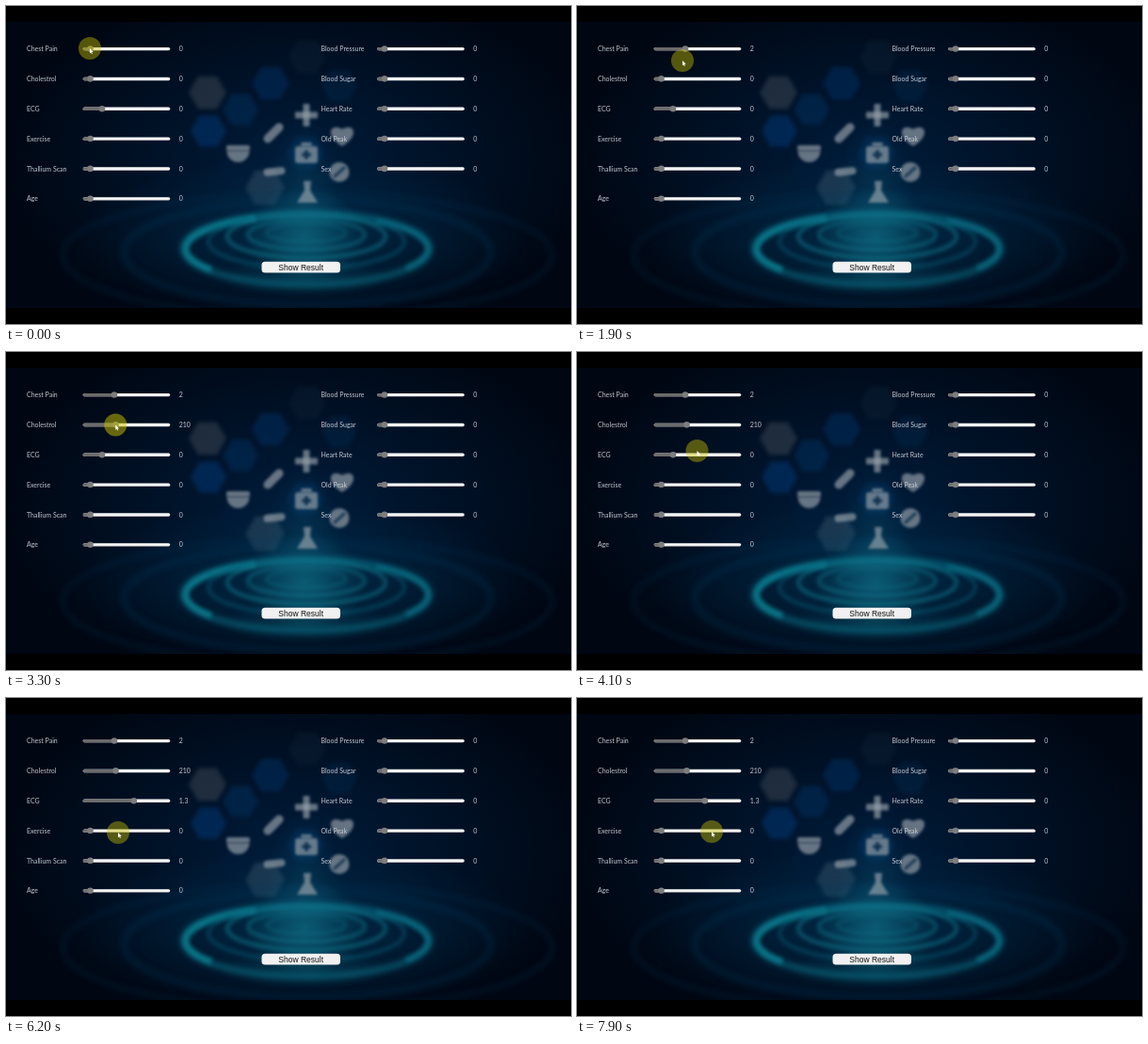
An HTML page with a canvas that plays this animation: 600 px wide and 338 px high, repeating every 8000 ms.

```html
<!DOCTYPE html>
<html>
<head>
<meta charset="utf-8">
<style>
  html, body { margin: 0; height: 100%; overflow: hidden; background: #000; }
  canvas { display: block; }
</style>
</head>
<body>
<canvas id="stage" width="600" height="338"></canvas>
<script>
const W = 600, H = 338, LOOP = 8000;
const ctx = document.getElementById('stage').getContext('2d');
const scenery = paintScenery();

const row = i => 45.5 + 31.85 * i;
const left = ['Chest Pain', 'Cholestrol', 'ECG', 'Exercise', 'Thallium Scan', 'Age'];
const right = ['Blood Pressure', 'Blood Sugar', 'Heart Rate', 'Old Peak', 'Sex'];

// Slider drags: time span, knob travel and the value shown
const drags = [
  { t0: 700, t1: 1500, x0: 89.5, x1: 115, show: u => Math.round(2 * u) },
  { t0: 2600, t1: 3200, x0: 89.5, x1: 116.5, show: u => Math.round(210 * u) },
  { t0: 4600, t1: 5100, x0: 102, x1: 135.8, show: u => +(1.3 * u).toFixed(1) }
];

// Pointer stops: time, x, y
const path = [
  [0, 89, 45], [700, 89, 45], [1500, 114.5, 45], [1800, 114.5, 45],
  [1900, 112, 58], [2500, 89, 77], [2600, 89, 77], [3200, 116.3, 77.5],
  [3700, 116.3, 77.5], [4100, 127.5, 105], [4500, 102, 109.5], [4600, 102, 109.5],
  [5100, 134.5, 110], [5500, 134.5, 110], [6200, 119, 143], [7900, 143, 142], [8000, 143, 142]
];

function ease(t, a, b) {
  const u = Math.min(1, Math.max(0, (t - a) / (b - a)));
  return u * u * (3 - 2 * u);
}
const mix = (a, b, u) => a + (b - a) * u;

function pointerAt(t) {
  const i = Math.max(1, path.findIndex(p => p[0] > t));
  const [a, b] = [path[i - 1], path[i]];
  const u = ease(t, a[0], b[0]);
  return [mix(a[1], b[1], u), mix(a[2], b[2], u)];
}

function shape(c, color, points) {
  c.fillStyle = color;
  c.beginPath();
  points.forEach(p => c.lineTo(p[0], p[1]));
  c.closePath();
  c.fill();
}
function disc(c, color, x, y, r, from = 0, to = 2 * Math.PI) {
  c.fillStyle = color;
  c.beginPath();
  c.arc(x, y, r, from, to);
  c.fill();
}
function bar(c, color, x, y, w, h, r) {
  c.fillStyle = color;
  c.beginPath();
  c.roundRect(x, y, w, h, r);
  c.fill();
}

function paintScenery() {
  const canvas = document.createElement('canvas');
  canvas.width = W;
  canvas.height = H;
  const c = canvas.getContext('2d');

  // Soft elliptical light
  const glow = (x, y, rx, ry, color) => {
    c.save();
    c.translate(x, y);
    c.scale(rx, ry);
    const g = c.createRadialGradient(0, 0, 0, 0, 0, 1);
    g.addColorStop(0, `rgba(${color})`);
    g.addColorStop(1, `rgba(${color.replace(/[\d.]+$/, '0')})`);
    c.fillStyle = g;
    c.fillRect(-1, -1, 2, 2);
    c.restore();
  };
  const hex = (x, y, r, color) => shape(c, color, [0, 1, 2, 3, 4, 5].map(k =>
    [x + r * Math.cos(k * Math.PI / 3), y + r * Math.sin(k * Math.PI / 3)]));
  const ring = (x, y, rx, ry, width, color, from = 0, to = 360) => {
    c.strokeStyle = color;
    c.lineWidth = width;
    c.beginPath();
    c.ellipse(x, y, rx, ry, 0, from * Math.PI / 180, to * Math.PI / 180);
    c.stroke();
  };
  const pill = (x, y, w, h, angle) => {
    c.save();
    c.translate(x, y);
    c.rotate(angle);
    bar(c, icon, -w / 2, -h / 2, w, h, h / 2);
    c.restore();
  };
  const plus = (x, y, r, w, color) => {
    bar(c, color, x - r, y - w / 2, 2 * r, w, 1);
    bar(c, color, x - w / 2, y - r, w, 2 * r, 1);
  };

  c.fillStyle = '#000713';
  c.fillRect(0, 0, W, H);
  glow(310, 165, 310, 190, '0,32,66,0.85');
  glow(315, 245, 240, 85, '0,55,88,0.6');

  c.filter = 'blur(2px)';
  hex(214, 92, 20, 'rgba(62,72,86,.5)');
  hex(215, 133, 19, 'rgba(0,58,120,.5)');
  hex(249, 110, 19, 'rgba(0,52,100,.45)');
  hex(281, 82, 20, 'rgba(0,56,112,.4)');
  hex(275, 193, 21, 'rgba(62,92,112,.42)');
  hex(318, 156, 20, 'rgba(0,50,95,.45)');
  hex(320, 54, 20, 'rgba(20,42,62,.3)');
  hex(354, 85, 19, 'rgba(0,50,90,.3)');
  hex(245, 175, 18, 'rgba(0,30,60,.35)');

  // Platform rings
  c.filter = 'blur(3px)';
  ring(320, 265, 260, 66, 5, 'rgba(0,60,95,.22)');
  ring(320, 262, 195, 56, 7, 'rgba(0,65,100,.25)');
  ring(319, 258, 131, 38, 6, 'rgba(12,125,148,.6)');
  c.filter = 'blur(2px)';
  ring(319, 258, 128, 36, 7, 'rgba(14,150,165,.6)', 142, 245);
  ring(319, 258, 129, 36, 6, 'rgba(14,140,160,.45)', -55, 35);
  ring(319, 250, 104, 29, 4, 'rgba(8,95,120,.5)');
  ring(319, 245, 84, 23, 4, 'rgba(14,120,140,.6)');
  ring(319, 243, 62, 16, 4, 'rgba(14,115,135,.55)');
  ring(319, 241, 42, 10, 3, 'rgba(14,115,135,.4)');
  c.filter = 'none';
  glow(317, 245, 65, 52, '20,135,155,0.5');
  glow(317, 205, 40, 85, '15,100,130,0.28');
  glow(318, 288, 90, 22, '10,110,135,0.35');

  // Medical icons
  c.filter = 'blur(1.6px)';
  const icon = 'rgba(150,160,170,.68)', gap = 'rgba(10,45,75,.9)';
  plus(319, 116, 12, 7, icon);
  pill(284, 135, 26, 9, -Math.PI / 4);
  pill(285, 176, 23, 8, -0.1);
  bar(c, icon, 234, 148, 25, 6, 2);
  disc(c, icon, 246.5, 154, 12, 0, Math.PI);
  c.fillStyle = icon;
  c.beginPath();
  c.moveTo(357, 149);
  c.bezierCurveTo(338, 138, 344, 124, 357, 131);
  c.bezierCurveTo(370, 124, 376, 138, 357, 149);
  c.fill();
  bar(c, icon, 307, 149, 24, 18, 3);
  bar(c, icon, 313, 145, 12, 4, 2);
  plus(319, 158, 5, 3.5, gap);
  disc(c, icon, 354, 176.5, 10.5);
  shape(c, gap, [[347, 181], [349, 183], [361, 172], [359, 170]]);
  shape(c, icon, [[316, 186], [324, 186], [323, 196], [331, 209], [309, 209], [317, 196]]);
  c.filter = 'none';

  c.fillStyle = '#000';
  c.fillRect(0, 0, W, 17);
  c.fillRect(0, 321, W, 17);
  return canvas;
}

function slider(label, x, y, knob, value) {
  ctx.font = '7px Lato, sans-serif';
  ctx.fillStyle = '#c3c8cf';
  ctx.fillText(label, x, y + 2.6);
  ctx.fillText(value, x + 161.7, y + 2.6);
  bar(ctx, '#f4f4f4', x + 59.7, y - 1.6, 92.6, 3.4, 1.7);
  bar(ctx, '#6c6c6c', x + 59.7, y - 1.6, knob - x - 59.7, 3.4, 1.7);
  disc(ctx, '#7d7d7d', knob, y, 3.3);
}

function pointer(t) {
  const [x, y] = pointerAt(t);
  const held = drags.some(d => t >= d.t0 && t <= d.t1 + 200);
  disc(ctx, `rgba(205,195,0,${held ? .5 : .42})`, x, y, 12);
  ctx.save();
  ctx.translate(x, y);
  shape(ctx, '#fff', [[0, 0], [0, 5.2], [1.2, 4.2], [2, 6], [2.9, 5.6], [2.1, 3.9], [3.7, 3.8]]);
  ctx.restore();
}

function draw(t) {
  ctx.drawImage(scenery, 0, 0);
  left.forEach((label, i) => {
    const d = drags[i];
    const u = d ? ease(t, d.t0, d.t1) : 0;
    slider(label, 22, row(i), d ? mix(d.x0, d.x1, u) : 89.5, d ? d.show(u) : 0);
  });
  right.forEach((label, i) => slider(label, 334.5, row(i), 402, 0));

  bar(ctx, '#f1f1f1', 271.5, 271.8, 83.5, 11.6, 3.5);
  ctx.font = '8.5px "Liberation Sans", Arial, sans-serif';
  ctx.fillStyle = '#111';
  ctx.fillText('Show Result', 289.3, 280.5);
  pointer(t);
}

const start = performance.now();
function tick() {
  const t = (performance.now() - start) % LOOP;
  draw(Math.floor(t / 100) * 100);
  requestAnimationFrame(tick);
}
tick();
</script>
</body>
</html>
```
